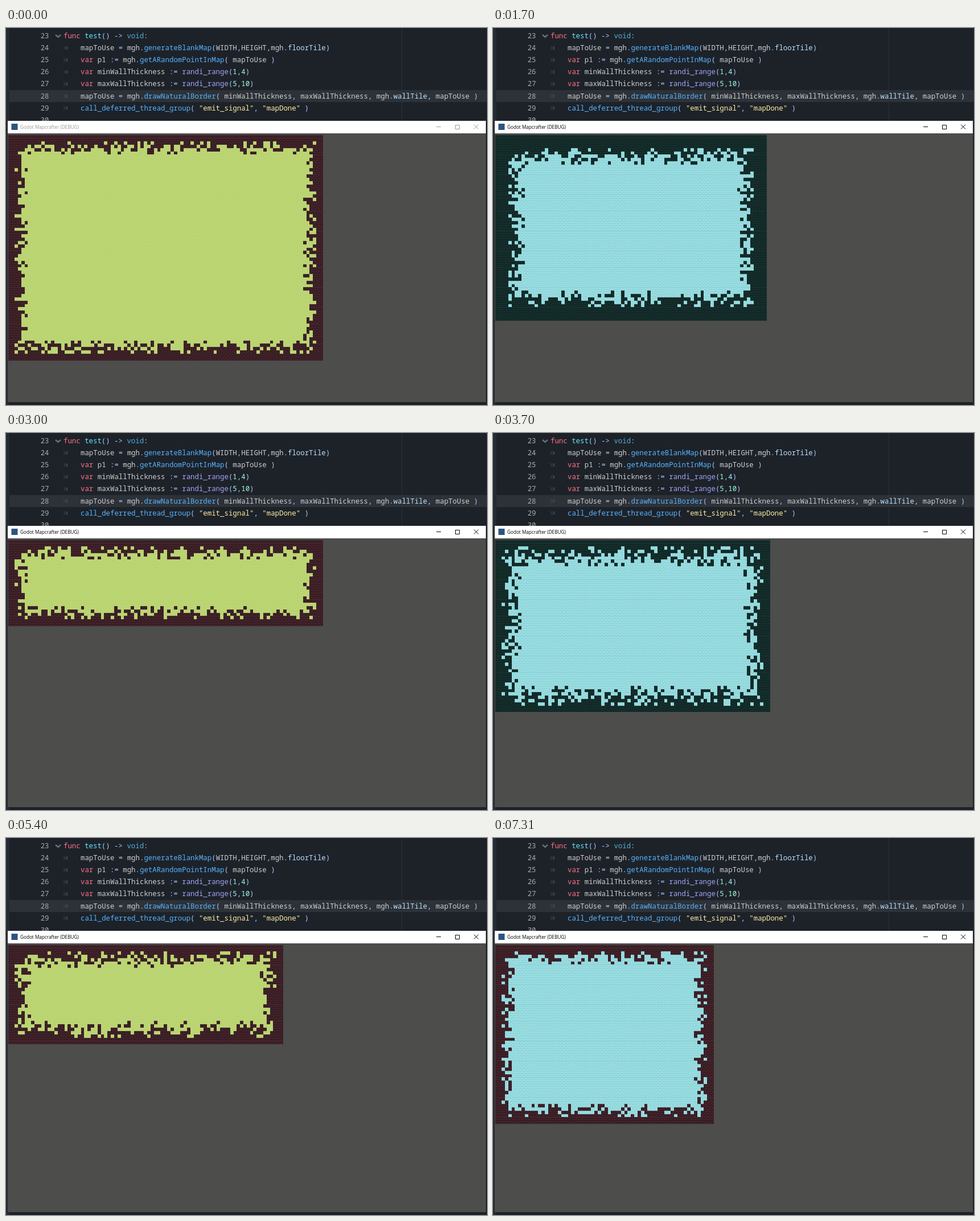
Recreate the animation shown at these times as an HTML page with a canvas. Size 845 px wide and 662 px high, loop 7710 ms.

```html
<!DOCTYPE html>
<html lang="en">
<head>
<meta charset="utf-8">
<title>Map generator</title>
<style>
  html, body { margin: 0; width: 100%; height: 100%; overflow: hidden; background: #1d2229; }
  svg, canvas { position: absolute; left: 0; top: 0; display: block; }
  .code { font: 12.38px "Noto Sans Mono", "DejaVu Sans Mono", monospace; fill: #cdcfd2; white-space: pre; }
  .num { fill: #a9acb1; text-anchor: end; }
  .k { fill: #ff7085; } .d { fill: #66e6ff; } .f { fill: #57b3ff; } .t { fill: #4fb0d8; }
  .s { fill: #abc9ff; } .n { fill: #a1ffe0; } .q { fill: #ffeda1; } .g { fill: #a3a3f5; } .m { fill: #bce0ff; }
  .tab { fill: none; stroke: #4b5059; }
  #bar { color: #999; }
  #bar.active { color: #000; }
  #bar text { font: 8.2px "Open Sans", "Noto Sans", sans-serif; fill: currentColor; }
  #bar path { fill: none; stroke: currentColor; }
</style>
</head>
<body>
<svg width="845" height="662" viewBox="0 0 845 662">
  <rect width="845" height="662" fill="#1d2229"/>
  <rect width="6" height="662" fill="#252b34"/>
  <rect x="6" y="109" width="839" height="21" fill="#2d3238"/>
  <rect x="695" width="1" height="163" fill="#2b3037"/>
  <path d="M87 12l4.500 4 4.500-4" fill="none" stroke="#6b7078" stroke-width="2.400"/>
  <g id="code"></g>
  <rect x="3" y="163" width="840" height="22" fill="#fff"/>
  <rect x="3" y="185" width="840" height="472" fill="#4d4d4b"/>
  <rect x="9.500" y="168" width="11" height="11" fill="#2c5580"/>
  <g id="bar">
    <text x="25" y="177">Godot Mapcrafter (DEBUG)</text>
    <path d="M756 173.500h8M789.500 170.500h7v7h-7zM822 169.500l8 8m0-8l-8 8"/>
  </g>
</svg>
<canvas id="map" width="845" height="662"></canvas>
<script>
// Each token is "class:text"; a missing class means plain text.
const lines = [
  ["k:func", " ", "d:test", "s:() -> ", "t:void", "s::"],
  ["mapToUse ", "s:= ", "mgh", "s:.", "f:generateBlankMap", "s:(", "WIDTH", "s:,", "HEIGHT", "s:,", "mgh", "s:.", "m:floorTile", "s:)"],
  ["k:var", " p1 ", "s::= ", "mgh", "s:.", "f:getARandomPointInMap", "s:( ", "mapToUse", "s: )"],
  ["k:var", " minWallThickness ", "s::= ", "g:randi_range", "s:(", "n:1", "s:,", "n:4", "s:)"],
  ["k:var", " maxWallThickness ", "s::= ", "g:randi_range", "s:(", "n:5", "s:,", "n:10", "s:)"],
  ["mapToUse ", "s:= ", "mgh", "s:.", "f:drawNaturalBorder", "s:( ", "minWallThickness", "s:, ", "maxWallThickness", "s:, ", "mgh", "s:.", "m:wallTile", "s:, ", "mapToUse", "s: )"],
  ["f:call_deferred_thread_group", "s:( ", 'q:"emit_signal"', "s:, ", 'q:"mapDone"', "s: )"],
  []
];

const span = token => {
  const [, cls, text] = token.match(/^(?:([a-z]):)?(.*)$/);
  return `<tspan class="${cls || ""}">${text.replace(/>/g, "&gt;")}</tspan>`;
};

document.getElementById("code").innerHTML = lines.map((tokens, i) => {
  const y = 18 + i * 21.1;
  const indented = i > 0 && tokens.length;
  const tab = indented ? `<path class="tab" d="M101 ${y - 7}l3 3-3 3M104.500 ${y - 7}l2.500 3-2.500 3M107.500 ${y - 7}v6"/>` : "";
  return `<text class="code num" x="75.500" y="${y}">${23 + i}</text>${tab}` +
    `<text class="code" x="${i ? 131 : 101}" y="${y}">${tokens.map(span).join("")}</text>`;
}).join("");

const LOOP = 7710, FOCUS = 500;
const TILE = 5.824, LEFT = 3.5, TOP = 187.5;

const brick = (dark, light) => ({ base: dark, detail: light, brick: true });
const MAROON = brick("#33191f", "#56323b");
const TEAL = brick("#0f2423", "#1f3d3a");
const CYAN = brick("#9de1e4", "#80c6ce");
const GREEN = { base: "#bbd573", detail: "#b0cb6c" };

// start ms, columns, rows, thinnest wall, thickest wall, wall, floor
const scenes = [
  [0, 95, 68, 2, 6, MAROON, GREEN],
  [900, 71, 44, 2, 6, MAROON, CYAN],
  [1300, 62, 60, 3, 7, TEAL, GREEN],
  [1700, 82, 56, 4, 9, TEAL, CYAN],
  [2200, 64, 31, 1, 5, MAROON, GREEN],
  [2600, 61, 27, 2, 6, TEAL, CYAN],
  [2900, 95, 26, 2, 6, MAROON, GREEN],
  [3300, 70, 34, 3, 7, TEAL, CYAN],
  [3700, 83, 52, 2, 8, TEAL, CYAN],
  [4000, 70, 45, 2, 6, MAROON, CYAN],
  [4400, 85, 66, 3, 8, MAROON, GREEN],
  [4700, 72, 57, 2, 6, TEAL, CYAN],
  [5100, 60, 48, 4, 7, MAROON, CYAN],
  [5400, 83, 30, 2, 7, MAROON, GREEN],
  [5810, 97, 69, 3, 7, TEAL, CYAN],
  [6210, 59, 22, 4, 5, MAROON, GREEN],
  [6510, 70, 29, 2, 6, TEAL, GREEN],
  [6910, 87, 57, 3, 8, MAROON, GREEN],
  [7310, 66, 54, 2, 6, MAROON, CYAN]
];

const ctx = document.getElementById("map").getContext("2d");
const bar = document.getElementById("bar");

function seeded(seed) {
  return () => {
    seed = (seed + 0x6d2b79f5) | 0;
    let v = Math.imul(seed ^ (seed >>> 15), 1 | seed);
    v = (v + Math.imul(v ^ (v >>> 7), 61 | v)) ^ v;
    return ((v ^ (v >>> 14)) >>> 0) / 4294967296;
  };
}

function drawTile(col, row, kind) {
  const x = Math.round(LEFT + col * TILE), y = Math.round(TOP + row * TILE);
  const w = Math.round(LEFT + (col + 1) * TILE) - x;
  const h = Math.round(TOP + (row + 1) * TILE) - y;
  ctx.fillStyle = kind.base;
  ctx.fillRect(x, y, w, h);
  ctx.fillStyle = kind.detail;
  if (kind.brick) {
    ctx.fillRect(x, y + 1, w, 1);
    ctx.fillRect(x, y + 4, w, 1);
    ctx.fillStyle = kind.base;
    ctx.fillRect(x + 1, y + 1, 1, 1);
    ctx.fillRect(x + 4, y + 4, 1, 1);
  } else {
    ctx.fillRect(x + 1, y + 1, 1, 1);
    ctx.fillRect(x + 4, y + 3, 1, 1);
  }
}

function drawMap(index) {
  const [, cols, rows, min, max, wall, floor] = scenes[index];
  const random = seeded(index * 977 + 5);
  ctx.clearRect(0, 0, 845, 662);
  for (let row = 0; row < rows; row++) {
    for (let col = 0; col < cols; col++) {
      const depth = Math.min(col, row, cols - 1 - col, rows - 1 - row);
      const solid = depth < min || random() < (max - depth) / (max - min + 1);
      drawTile(col, row, solid ? wall : floor);
    }
  }
}

let shown = -1;
function frame() {
  const t = performance.now() % LOOP;
  const index = scenes.findLastIndex(scene => scene[0] <= t);
  bar.classList.toggle("active", t >= FOCUS);
  if (index !== shown) drawMap(shown = index);
  requestAnimationFrame(frame);
}
frame();
</script>
</body>
</html>
```
